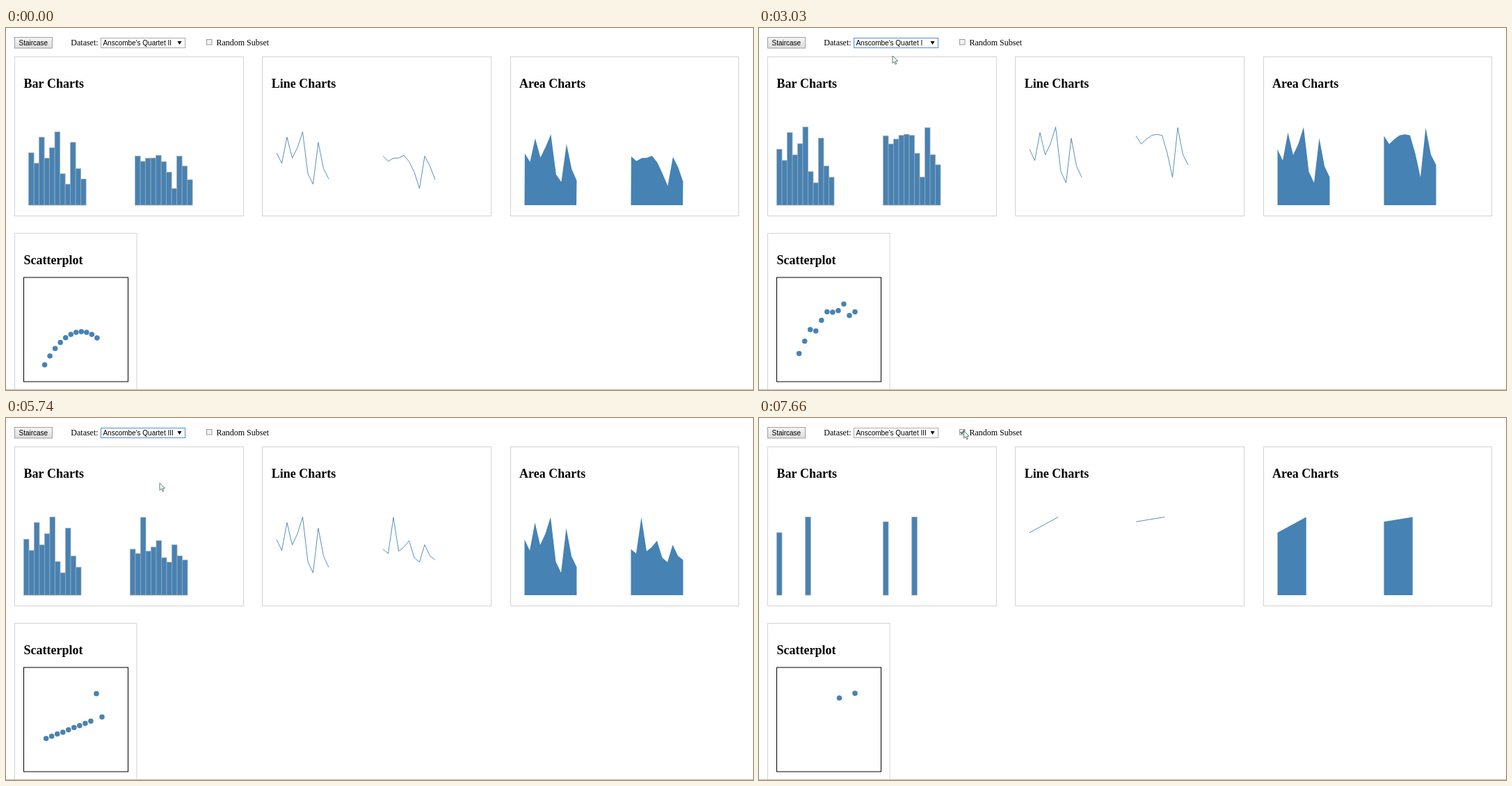
Animation of 1074 by 521 pixels, one loop 8 s. Source, as an HTML page with a canvas:

```html
<!DOCTYPE html>
<html lang="en">
<head>
<meta charset="utf-8">
<title>Animated charts</title>
<style>
  html, body { margin: 0; height: 100%; overflow: hidden; background: #fff; }
  canvas { display: block; }
</style>
</head>
<body>
<canvas id="stage" width="1074" height="521"></canvas>
<script>
const ctx = document.getElementById('stage').getContext('2d');
const LOOP = 8000, BLUE = 'steelblue';
const SERIF = '"Liberation Serif", serif', SANS = '"Liberation Sans", sans-serif';
const OPTIONS = ['I', 'II', 'III', 'IV'].map(n => "Anscombe's Quartet " + n);

// The second set is a parabola, the third a line with one outlier
const xs = [10, 8, 13, 9, 11, 14, 6, 4, 12, 7, 5];
const noisy = [8.04, 6.95, 7.58, 8.81, 8.33, 9.96, 7.24, 4.26, 10.84, 4.82, 5.68];
const curved = xs.map(x => -6 + 2.781 * x - .1267 * x * x);
const outlier = x => x === 13 ? 12.74 : 4.01 + .345 * x;
const subset = [4, 5];

// Points are [x, height above the baseline]
function series(values, initial) {
  const step = 82.5 / values.length;
  const scale = initial ? 7.5 : 112.5 / Math.max(...values);
  const heights = values.map(v => v * scale);
  const line = heights.map((h, i) => [7.5 + i * step, h]);
  return {
    heights, line,
    bars: heights.map((h, i) => [i * step + (initial ? 7.5 : 0), h]),
    area: initial
      ? [[7.5, 0], ...line, [82.5, 0]]
      : [...line, ...line.map(p => [p[0], 0]).reverse()]
  };
}

function chartState(a, b, initial) {
  const sets = [series(a, initial), series(b, initial)];
  return { sets, dots: a.map((_, i) => sets.map(s => s.heights[i])) };
}

const states = [
  chartState(xs, curved, true), chartState(xs, curved), chartState(xs, noisy),
  chartState(xs, xs.map(outlier)), chartState(subset, subset.map(outlier))
];

// Clicks: open menu, choose, open menu, choose, tick the box
const clicks = [1490, 2480, 3790, 4810, 6580];
const HOLD = 150;
const releases = clicks.map(c => c + 85);
const starts = [-235, releases[1], releases[3], releases[4]];
const moves = [
  { from: 1070, to: 1170, x: 192, y: 18.5 },
  { from: 1800, to: 2100, x: 192, y: 40 },
  { from: 3300, to: 3570, x: 225.5, y: 25 },
  { from: 4060, to: 4430, x: 221, y: 93.5 },
  { from: 5750, to: 6270, x: 294.5, y: 18.5 }
];

const lerp = (a, b, u) => a + (b - a) * u;
const passed = (times, t) => times.filter(s => s <= t).length;
const cubicInOut = u => u < .5 ? 4 * u ** 3 : 1 - 4 * (1 - u) ** 3;

// Points without a predecessor appear directly at their end position
const mix = (from, to, e) => to.map((p, i) => p.map((v, k) => lerp((from[i] || p)[k], v, e)));

function cursorAt(t) {
  return moves.reduce(([x, y], m) => {
    const u = Math.max(0, Math.min(1, (t - m.from) / (m.to - m.from)));
    return [lerp(x, m.x, u), lerp(y, m.y, u)];
  }, [192, 4]);
}

function text(str, x, y, font, color = '#000') {
  ctx.font = font;
  ctx.fillStyle = color;
  ctx.fillText(str, x, y);
}

function box(x, y, w, h, stroke, fill, width = 1) {
  ctx.lineWidth = width;
  if (fill) { ctx.fillStyle = fill; ctx.fillRect(x, y, w, h); }
  if (stroke) { ctx.strokeStyle = stroke; ctx.strokeRect(x, y, w, h); }
}

function trace(points, x, y) {
  ctx.beginPath();
  points.forEach(p => ctx.lineTo(x + p[0], y - p[1]));
}

function strokePath(color, width) {
  ctx.strokeStyle = color;
  ctx.lineWidth = width;
  ctx.stroke();
}

function disc(x, y, r, color) {
  ctx.fillStyle = color;
  ctx.beginPath();
  ctx.arc(x, y, r, 0, 7);
  ctx.fill();
}

// Draws moving items, and fades out those that have no counterpart any more
function joined(from, to, e, draw) {
  mix(from, to, e).forEach(draw);
  ctx.globalAlpha = 1 - e;
  from.slice(to.length).forEach(draw);
  ctx.globalAlpha = 1;
}

function drawCharts(t) {
  const n = passed(starts, t) - 1;
  const e = cubicInOut(Math.min(1, (t - starts[n]) / 1000));
  const from = states[n], to = states[n + 1];
  to.sets.forEach((set, i) => {
    const old = from.sets[i], dx = i * 153;
    joined(old.bars, set.bars, e, ([x, h]) =>
      box(25.5 + dx + x, 255 - h, 7.5, h, '#a9a9a9', BLUE, .75));
    trace(mix(old.line, set.line, e), 381.5 + dx, 255);
    strokePath(BLUE, .9);
    trace(mix(old.area, set.area, e), 738 + dx, 255);
    ctx.fillStyle = BLUE;
    ctx.fill();
  });
  joined(from.dots, to.dots, e, ([x, y]) => disc(25.5 + x, 508.8 - y, 3.75, BLUE));
}

function drawCards() {
  ['Bar Charts', 'Line Charts', 'Area Charts'].forEach((title, i) => {
    const dx = i * 356.3;
    const left = Math.round(12 + dx) + .5, right = Math.floor(341 + dx) + .5;
    box(left, 41.5, right - left, 229, '#d3d3d3');
    text(title, 25.5 + dx, 85.5, 'bold 18px ' + SERIF);
  });
  box(12.5, 295.5, 175.5, 240, '#d3d3d3');
  text('Scatterplot', 25.5, 339.5, 'bold 18px ' + SERIF);
  box(25.5, 359, 150, 150, '#000');
  box(0, 520, 1074, 1, null, '#b4b4b4');
}

function drawControls(t, selected) {
  const shade = ctx.createLinearGradient(0, 13, 0, 29);
  shade.addColorStop(0, '#f6f6f6');
  shade.addColorStop(1, '#dcdcdc');
  box(12.5, 13.5, 54, 15.5, '#a0a0a0', shade);
  text('Staircase', 18.5, 25.3, '10px ' + SANS);

  const focused = t >= clicks[0] && t < clicks[4];
  text('Dataset:', 93.3, 25.4, '12px ' + SERIF);
  box(136.5, 14.5, 121, 14, focused ? '#4f8be0' : '#a9a9a9', '#fff');
  text(OPTIONS[selected], 139.4, 25.3, '10px ' + SANS);
  trace([[0, 0], [6, 0], [3, -5]], 246.5, 19);
  ctx.fill();

  box(288.5, 16.5, 7.5, 7.5, '#999', '#f1f1f1');
  if (t >= releases[4]) {
    trace([[0, 0], [2, -2.2], [5.5, 3]], 289.7, 20.3);
    strokePath('#456b55', 1.6);
  }
  text('Random Subset', 302.4, 25.4, '12px ' + SERIF);
}

function drawMenu(active) {
  box(136.5, 28.5, 121, 108, '#5a7fb5', '#fff');
  box(136, 28, 1, 109, null, '#333');
  OPTIONS.forEach((option, i) => {
    const y = 28.8 + i * 26.7;
    if (i === active) box(137, Math.round(y), 120, 27, null, '#1e90ff');
    text(option, 140.2, y + 17.3, '10px ' + SANS, i === active ? '#fff' : '#000');
  });
}

function drawCursor(x, y, pressed) {
  if (pressed) disc(x, y + .5, 10, 'rgba(250, 225, 20, .65)');
  trace([[0, 0], [0, -10.5], [2.5, -8.3], [4.2, -12.3], [5.8, -11.6], [4.2, -7.8], [7.5, -7.6]], x, y);
  ctx.closePath();
  ctx.fillStyle = '#fff';
  ctx.fill();
  strokePath('#3f7058', .9);
}

function draw(t) {
  const done = passed(releases, t);
  const selected = done < 2 ? 1 : done < 4 ? 0 : 2;
  box(0, 0, 1074, 521, null, '#fff');
  drawCards();
  drawCharts(t);
  drawControls(t, selected);
  if (t < moves[0].from) return;
  const [x, y] = cursorAt(t);
  const menuOpen = done === 1 || done === 3;
  if (menuOpen) drawMenu(y > 28.8 ? Math.floor((y - 28.8) / 26.7) : selected);
  drawCursor(x, y, clicks.some(c => t >= c && t < c + HOLD));
}

const begin = performance.now();
function frame() {
  draw((performance.now() - begin) % LOOP);
  requestAnimationFrame(frame);
}
frame();
</script>
</body>
</html>
```
